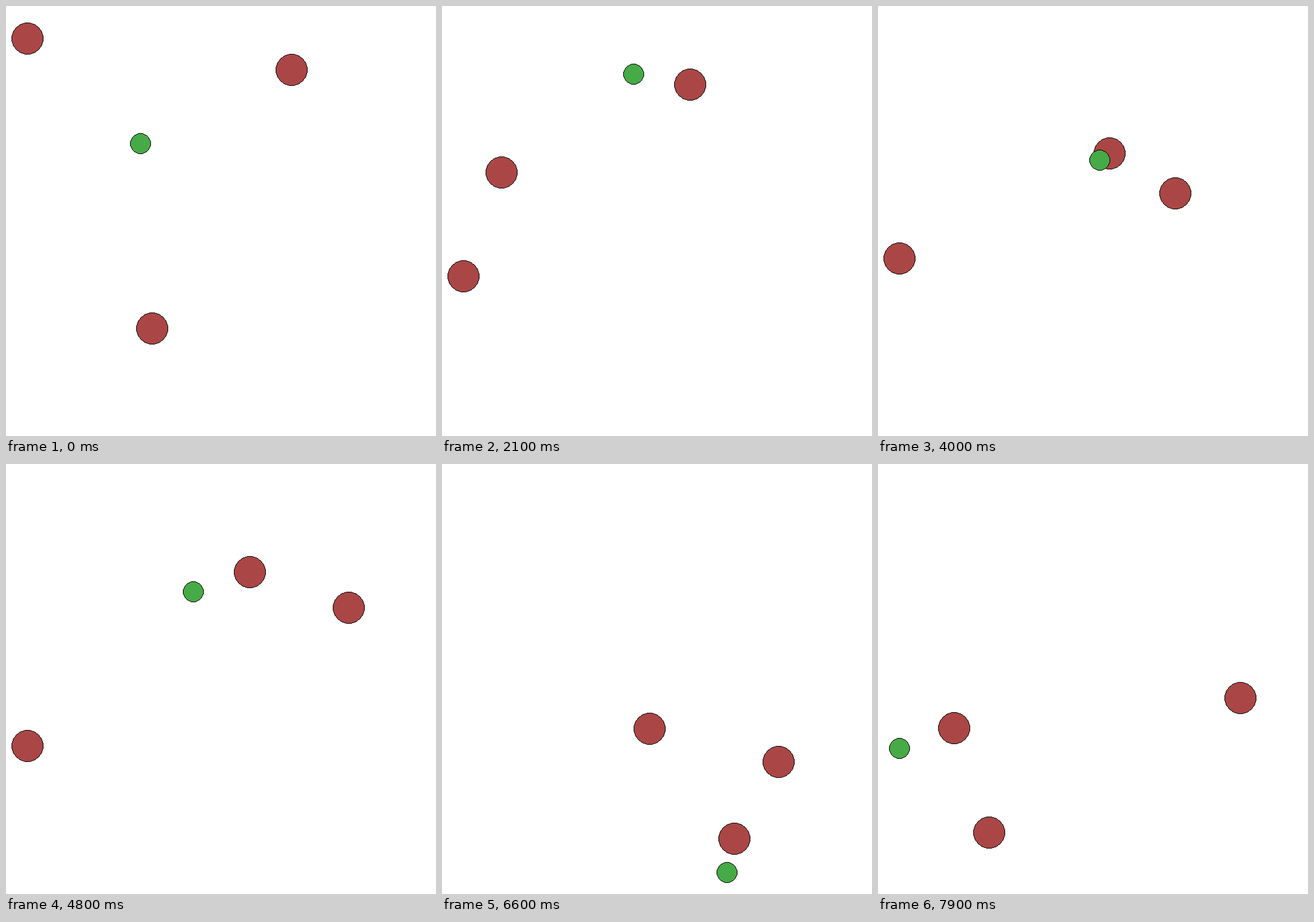
Write an HTML page with a canvas that moves like this. It is 700 by 700 pixels and loops after 8000 ms.

```html
<!DOCTYPE html>
<html>
<head>
<meta charset="utf-8">
<title>Chase</title>
<style>
  html, body { margin: 0; height: 100%; overflow: hidden; background: #fff; }
  canvas { display: block; width: 100vw; height: 100vh; }
</style>
</head>
<body>
<canvas width="700" height="700"></canvas>
<script>
const STEP = 100, STEPS = 80, CENTER = 350, REACH = 315;
const RED = '#aa4646', GREEN = '#46aa46';

// Key poses: step, then x and y of three chasers and the runner
const poses = [
  [0, 35, 53, 465, 104, 238, 525, 219, 224],
  [12, 35, 251, 417, 351, 58, 293, 74, 246],
  [21, 35, 440, 404, 128, 97, 271, 312, 111],
  [31, 35, 367, 363, 307, 359, 362, 414, 314],
  [48, 35, 459, 397, 176, 558, 234, 305, 208],
  [54, 35, 440, 405, 300, 539, 202, 345, 440],
  [66, 338, 431, 476, 610, 548, 485, 464, 665],
  [72, 290, 425, 350, 665, 561, 425, 269, 610],
  [79, 590, 381, 181, 600, 124, 430, 35, 463]
];
// The first and third chasers are listed by place in the last pose; restore their order
const last = poses[poses.length - 1];
[last[1], last[2], last[5], last[6]] = [last[5], last[6], last[1], last[2]];

// Smooth curve through the poses
function along(step, k) {
  const end = poses.length - 1;
  let i = 0;
  while (i < end - 1 && poses[i + 1][0] <= step) i++;
  const slope = j => {
    const a = poses[Math.max(j - 1, 0)], b = poses[Math.min(j + 1, end)];
    return (b[k] - a[k]) / (b[0] - a[0]);
  };
  const [p, q] = [poses[i], poses[i + 1]], span = q[0] - p[0], u = (step - p[0]) / span;
  return p[k] + (q[k] - p[k]) * u * u * (3 - 2 * u) +
    u * (1 - u) * span * ((1 - u) * slope(i) - u * slope(i + 1));
}

// One octant of a one-pixel-wide midpoint circle
function octant(r) {
  const points = [];
  for (let x = 0, y = r, f = 1 - r; x < y;) {
    if (f >= 0) f -= 2 * --y;
    x++;
    f += 2 * x + 1;
    points.push([x, y], [y, x]);
  }
  return points;
}

const ctx = document.querySelector('canvas').getContext('2d');

function disc(cx, cy, points, color) {
  ctx.fillStyle = color;
  for (const [x, y] of points)
    for (const row of [-y, y - 1]) ctx.fillRect(cx - x, cy + row, 2 * x, 1);
  ctx.fillStyle = '#000';
  for (const [x, y] of points)
    for (const row of [-y, y - 1])
      for (const col of [-x, x - 1]) ctx.fillRect(cx + col, cy + row, 1, 1);
}

const large = octant(26), small = octant(17);
const start = performance.now();

function draw() {
  const step = Math.floor((performance.now() - start) / STEP) % STEPS;
  const offsets = Array.from({ length: 8 }, (_, k) => along(step, k + 1) - CENTER);
  // The camera zooms so that the farthest agent stays at the margin
  const zoom = REACH / Math.max(...offsets.map(Math.abs));
  const at = k => Math.round(CENTER + offsets[k] * zoom);
  ctx.clearRect(0, 0, 700, 700);
  for (let k = 0; k < 8; k += 2)
    disc(at(k), at(k + 1), k < 6 ? large : small, k < 6 ? RED : GREEN);
  requestAnimationFrame(draw);
}
draw();
</script>
</body>
</html>
```
